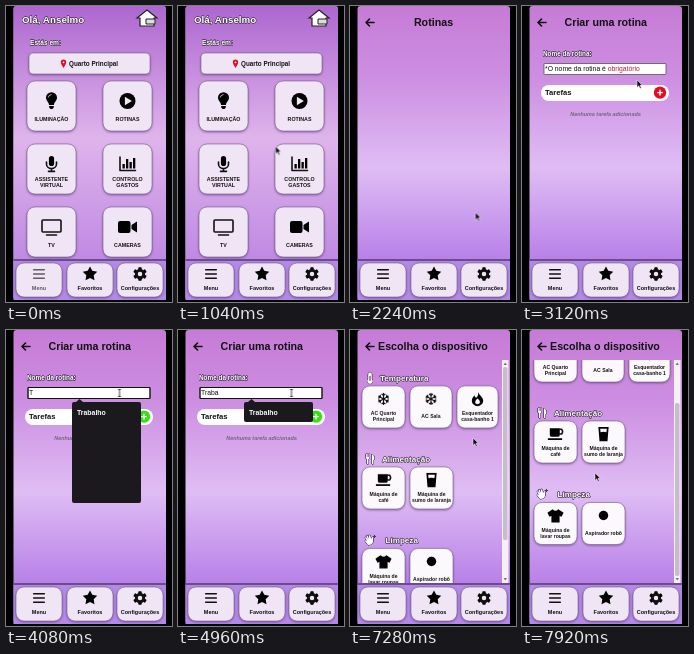
Animation of 166 by 296 pixels, one loop 8000 ms. Source, as an HTML page:

```html
<!DOCTYPE html>
<html lang="pt">
<head>
<meta charset="utf-8">
<title>Casa inteligente</title>
<style>
html, body { margin: 0; width: 100%; height: 100%; overflow: hidden; background: #000; }
svg { display: block; width: 100vw; height: 100vh; }
text { font: bold 5.5px "Liberation Sans", Arial, sans-serif; fill: #111; }
.mid { text-anchor: middle; }
.title { font-size: 10.7px; }
.glow { fill: #fff; stroke: #4a3a54; stroke-width: .9px; paint-order: stroke; stroke-linejoin: round; filter: drop-shadow(.5px .6px .6px #2b1b35); }
.card { fill: #efe5f5; stroke: #75608a; stroke-width: .6px; filter: drop-shadow(0 1px 1px #4b286688); }
.white .card { fill: #fcf9fd; }
.line { fill: none; stroke: #111; stroke-width: 1.6px; stroke-linecap: round; stroke-linejoin: round; }
.field { font-weight: normal; font-size: 6.8px; }
.hint { fill: #fff; }
.note { font-style: italic; fill: #75647e; }
.move { animation: 8s linear infinite; }
.menu { animation-name: release; }
.routines { animation-name: press; }
.add { animation-name: add; animation-timing-function: step-end; }
.list { animation-name: list; animation-timing-function: ease-in-out; }
.thumb { animation-name: thumb; animation-timing-function: ease-in-out; }
.pointer { animation-name: pointer; animation-timing-function: ease-in-out; }
@keyframes release { 0% { opacity: .65 } 5%, 100% { opacity: 1 } }
@keyframes press { 0%, 19% { opacity: 1 } 20.5%, 100% { opacity: .42 } }
@keyframes add { 0% { fill: #e50d1d } 51% { fill: #35e010 } 83.5%, 100% { fill: #8aea78 } }
@keyframes list { 0%, 90.8% { transform: none } 97%, 100% { transform: translateY(-46px) } }
@keyframes thumb { 0%, 90.8% { transform: none } 97%, 100% { transform: translateY(36px) } }
@keyframes pointer {
  0%, 1% { transform: translate(40px, 266px) }
  11% { transform: translate(95px, 150px) }
  18%, 22% { transform: translate(110px, 94px) }
  31%, 35% { transform: translate(130px, 240px) }
  39% { transform: translate(115px, 74px) }
  45%, 79% { transform: translate(113.5px, 63px) }
  83%, 86% { transform: translate(137px, 85px) }
  90%, 92% { transform: translate(123px, 108px) }
  99%, 100% { transform: translate(73px, 143px) }
}
</style>
</head>
<body>
<script>
const LOOP = 8000;
const rules = [];

// Wraps content so that it is seen only between two times of the loop.
function show(from, to, content) {
  const name = 'show' + rules.length;
  const pct = ms => ms / LOOP * 100 + '%';
  rules.push(`@keyframes ${name} { 0% { opacity: ${from ? 0 : 1} } ${pct(from)} { opacity: 1 } ` +
    `${pct(to)} { opacity: ${to < LOOP ? 0 : 1} } 100% { opacity: ${to < LOOP ? 0 : 1} } }`);
  return `<g style="animation:${name} 8s step-end infinite">${content}</g>`;
}

const at = (x, y, content, scale = 1) => `<g transform="translate(${x} ${y}) scale(${scale})">${content}</g>`;
const path = (d, attrs = '') => `<path d="${d}" ${attrs}/>`;
const line = d => path(d, 'class="line"');
const text = (x, y, s, cls = '', size = '') =>
  `<text x="${x}" y="${y}" class="${cls}"${size && ` style="font-size:${size}px"`}>${s}</text>`;
const box = (x, y, w, h, r, attrs = 'class="card"') =>
  `<rect x="${x}" y="${y}" width="${w}" height="${h}" rx="${r}" ${attrs}/>`;
const turn = (n, content) =>
  Array.from({ length: n }, (_, i) => `<g transform="rotate(${i * 360 / n})">${content}</g>`).join('');

const star = Array.from({ length: 10 }, (_, i) => {
  const r = i % 2 ? 3.9 : 7.6, a = i * Math.PI / 5;
  return (r * Math.sin(a)).toFixed(2) + ' ' + (-r * Math.cos(a)).toFixed(2);
}).join('L');

const icons = {
  menu: line('M-5.3-4.3H5.3M-5.3 0H5.3M-5.3 4.3H5.3'),
  star: path(`M${star}Z`),
  gear: turn(6, box(-1.7, -6.8, 3.4, 4, .7, '')) + '<circle r="3.7" fill="none" stroke="#111" stroke-width="2.9"/>',
  bulb: path('M-2.5 4C-2.5 1-5.5 0-5.5-3.5A5.5 5.3 0 0 1 5.5-3.5C5.5 0 2.5 1 2.5 4ZM-2.3 5H2.3V6.5L1 8H-1L-2.3 6.5Z') +
    path('M-3.3-3.5Q-3-6 0-6.5', 'fill="none" stroke="#efe5f5" stroke-width=".8"'),
  play: '<circle r="8"/>' + path('M-2.6-4.2L4.4 0L-2.6 4.2Z', 'fill="#efe5f5"'),
  mic: box(-2.6, -8, 5.2, 10, 2.6, '') + line('M-5-2V0A5 4.6 0 0 0 5 0V-2M0 4.8V7.4M-3 7.4H3'),
  chart: line('M-7.5-7V6.5H8') + path('M-5 0h2.3v4.5h-2.3ZM-1.5-5h2.3v9.5h-2.3ZM2-2h2.3v6.5H2ZM5.5-6h2.3V4.5H5.5Z'),
  tv: '<rect x="-9.5" y="-7" width="19" height="12" rx="1" class="line"/>' + line('M-5 8H5'),
  camera: box(-9.5, -6, 12.5, 12, 2, '') + path('M4-2L9.5-5.5V5.5L4 2Z'),
  snow: turn(6, path('M0 0V-6.2M-2-5.3L0-3.6L2-5.3', 'fill="none" stroke="#111" stroke-width="1.2"')),
  flame: path('M1-7C2-3 6-2 6 2A6 5.5 0 0 1-6 2C-6-1-4-3-3-4C-3-2-2-1.5-1-1.5C1-3 .5-5 1-7Z') +
    path('M0-.5Q3.4 2.5 2.3 4.5Q0 6.4-2.3 4.5Q-3 2.5 0-.5Z', 'fill="#fcf9fd"'),
  cup: path('M-6-6H4.5V1Q4.5 3 2.5 3H-4Q-6 3-6 1ZM-8 4.5H7V6.2H-8Z') + line('M4.5-5H6.5Q8.5-2.5 6.5 0H4.5'),
  glass: path('M-5.4-7.5H5.4L4.2 7.5H-4.2Z') + path('M-3.5-5.6H3.5L3.1-1.8Q0-3-3.1-1.8Z', 'fill="#fcf9fd"'),
  shirt: path('M-3-6.5Q0-3.3 3-6.5L8.5-3L6.4 1.4L4.3.4V7.4H-4.3V.4L-6.4 1.4L-8.5-3Z'),
  dot: '<circle r="5"/>',
  heat: path('M-1.8-3.6a1.8 1.8 0 0 1 3.6 0V1.2a2.6 2.6 0 1 1-3.6 0Z', 'class="glow"') + path('M0-2V3', 'stroke="#333"'),
  fork: path('M-4-5V-1Q-4 0-3 0V5H-1.6V0Q-.5 0-.5-1V-5H-1.4V-2H-2V-5H-2.6V-2H-3.2V-5ZM2 5V-5Q5-3 4 1H3.4V5Z', 'class="glow"'),
  hand: path('M-2 5L-5 1L-4.2 0L-2.6 1.4L-5-2.4L-4-3L-2.2-.4L-3.6-4.2L-2.5-4.6L-.8-1L-1.2-4.6L0-4.8L1.2-1L2-3L3.1-2.4L3 2Q2.2 5.2-2 5ZM4.5-5V-2M3-3.5H6', 'class="glow"')
};

function tile(x, y, w, h, icon, labels, cls = '') {
  const c = x + w / 2, big = h > 45;
  const first = y + (big ? (labels.length > 1 ? 37 : 40) : (labels.length > 1 ? 29 : 32));
  return `<g class="${cls}">${box(x, y, w, h, 8)}` +
    at(c, y + (big ? 20 : 13), icons[icon], big ? 1 : .95) +
    labels.map((s, i) => text(c, first + i * 6.2, s, 'mid', big ? 5.3 : 5.1)).join('') + '</g>';
}

const navTile = (x, icon, label, cls) =>
  box(x, 257, 46, 34, 8) + `<g class="${cls}">${at(x + 23, 268, icons[icon])}${text(x + 23, 284, label, 'mid')}</g>`;

const nav = '<path d="M7.5 253H160V294H7.5Z" fill="#b289e6"/><path d="M7.5 254H160" stroke="#26142f" stroke-width="1.2"/>' +
  navTile(10, 'menu', 'Menu', 'move menu') + navTile(61, 'star', 'Favoritos', '') + navTile(111, 'gear', 'Configurações', '');

const back = line('M24 16.5H16M19.5 13L16 16.5L19.5 20');

const home = text(16, 17, 'Olá, Anselmo', 'glow', 9.8) +
  path('M131 12L141 4L151 12H148V20H134V12Z', 'fill="#fff" stroke="#222" stroke-width="1.2"') +
  path('M140 13H149V18H140Z', 'fill="#ddd" stroke="#222"') +
  text(24, 39, 'Estás em:', 'glow', 6.6) +
  box(23, 47, 121, 21, 4) +
  path('M57.5 62Q54.8 58 54.8 56.3A2.7 2.7 0 0 1 60.2 56.3Q60.2 58 57.5 62Z', 'fill="#d51224"') +
  '<circle cx="57.5" cy="56.3" r=".9" fill="#fff"/>' +
  text(63, 59.5, 'Quarto Principal', '', 6.3) +
  tile(21, 75, 49, 50, 'bulb', ['ILUMINAÇÃO']) +
  tile(97, 75, 49, 50, 'play', ['ROTINAS'], 'move routines') +
  tile(21, 138, 49, 50, 'mic', ['ASSISTENTE', 'VIRTUAL']) +
  tile(97, 138, 49, 50, 'chart', ['CONTROLO', 'GASTOS']) +
  tile(21, 201, 49, 50, 'tv', ['TV']) +
  tile(97, 201, 49, 50, 'camera', ['CAMERAS']);

const routines = back + text(83.5, 20, 'Rotinas', 'title mid');

// Typed word: each prefix stays until the next key.
const word = 'Trabalho';
const keys = [4080, 4320, 4560, 4720, 4880, 5040, 5120, 5280, 6880];
const typed = [...word].map((_, i) => show(keys[i], keys[i + 1], text(23, 65.3, word.slice(0, i + 1), 'field'))).join('');

const menuBox = h => box(66, 72, 69, h, 2, 'fill="#1b191d"') +
  path('M70 72L73.5 69L77 72Z', 'fill="#1b191d"') + text(71, 84.5, word, 'hint', 6.9);
const hints = [[3840, 4320, 101], [4320, 4640, 52], [4640, 5360, 20]].map(([a, b, h]) => show(a, b, menuBox(h))).join('');

const create = back + text(83.8, 20, 'Criar uma rotina', 'title mid') +
  text(21, 49.5, 'Nome da rotina:', 'glow', 6.4) +
  box(22, 57.5, 122, 11, .5, 'fill="#fff" stroke="#555" stroke-width=".8"') +
  show(3760, 6080, box(22, 57.5, 122, 11, .5, 'fill="none" stroke="#111" stroke-width="1.2"')) +
  show(2800, 4080, text(23, 65.3, '*O nome da rotina é <tspan fill="#c01c3c">obrigatório</tspan>', 'field')) +
  typed + show(5360, 6080, path('M50.5 59.5V67', 'stroke="#111" stroke-width=".6"')) +
  box(19, 79, 128, 16, 8, 'fill="#fff"') + text(23, 89.2, 'Tarefas', '', 7.6) +
  '<circle cx="138" cy="86.6" r="6.2" class="move add"/>' +
  path('M135.2 86.6H140.8M138 83.8V89.4', 'stroke="#fff" stroke-width="1.4"') +
  text(83.5, 110, 'Nenhuma tarefa adicionada', 'mid note', 5.4) + hints;

const group = (y, icon, name, x) => at(20, y, icons[icon]) + text(x, y + 2.8, name, 'glow', 8.1);
const devices = back + text(28, 20, 'Escolha o dispositivo', 'title') +
  `<g clip-path="url(#view)" class="white"><g class="move list">` +
  group(48, 'heat', 'Temperatura', 30) +
  tile(12, 56, 43, 42, 'snow', ['AC Quarto', 'Principal']) +
  tile(60, 56, 42, 42, 'snow', ['AC Sala']) +
  tile(107, 56, 41, 42, 'flame', ['Esquentador', 'casa-banho 1']) +
  group(129, 'fork', 'Alimentação', 32) +
  tile(12, 137, 43, 42, 'cup', ['Máquina de', 'café']) +
  tile(60, 137, 43, 42, 'glass', ['Máquina de', 'sumo de laranja']) +
  group(210, 'hand', 'Limpeza', 35.5) +
  tile(12, 218.5, 43, 42, 'shirt', ['Máquina de', 'lavar roupas']) +
  tile(60, 218.5, 43, 42, 'dot', ['Aspirador robô']) + '</g></g>' +
  box(152, 30, 6.5, 223, 0, 'fill="#f4f0f6"') +
  path('M153.5 35L155.2 32.5L157 35ZM153.5 248L155.2 250.5L157 248Z', 'fill="#777"') +
  box(153, 37, 4.5, 173, 2, 'fill="#c5bdca" class="move thumb"');

const arrow = path('M0 0V7.5L1.8 5.8L3 8.5L4.3 8L3 5.3H5.3Z', 'fill="#111" stroke="#fff" stroke-width=".5"');
const beam = path('M-1.3-3.5H1.3M0-3.5V3.5M-1.3 3.5H1.3', 'stroke="#111" stroke-width=".8"');
const pointer = `<g class="move pointer">${show(160, 3520, arrow)}${show(3520, 6400, beam)}${show(6400, LOOP, arrow)}</g>`;

const wall = id => box(7.5, 0, 152.5, 294, 3, `fill="url(#${id})"`);
const picture = `<svg viewBox="0 0 166 296" preserveAspectRatio="none">
  <defs>
    <linearGradient id="wall" x1="0" y1="0" x2="0" y2="1">
      <stop offset="0" stop-color="#c67bd6"/><stop offset=".25" stop-color="#cd8fe2"/>
      <stop offset=".55" stop-color="#dfbdf4"/><stop offset=".86" stop-color="#b881e8"/>
      <stop offset="1" stop-color="#b27ce6"/>
    </linearGradient>
    <linearGradient id="dawn" x1="0" y1="0" x2="0" y2="1">
      <stop offset="0" stop-color="#ad67cf"/><stop offset=".45" stop-color="#dfb4eb"/>
      <stop offset="1" stop-color="#b57be0"/>
    </linearGradient>
    <clipPath id="view"><path d="M8 30H152V253H8Z"/></clipPath>
  </defs>
  ${wall('wall')}
  ${show(0, 1760, wall('dawn') + home)}
  ${show(1760, 2800, routines)}${show(2800, 6880, create)}${show(6880, LOOP, devices)}
  ${nav}${pointer}
</svg>`;

const style = document.createElement('style');
style.textContent = rules.join('\n');
document.head.append(style);
document.body.insertAdjacentHTML('beforeend', picture);
</script>
</body>
</html>
```
